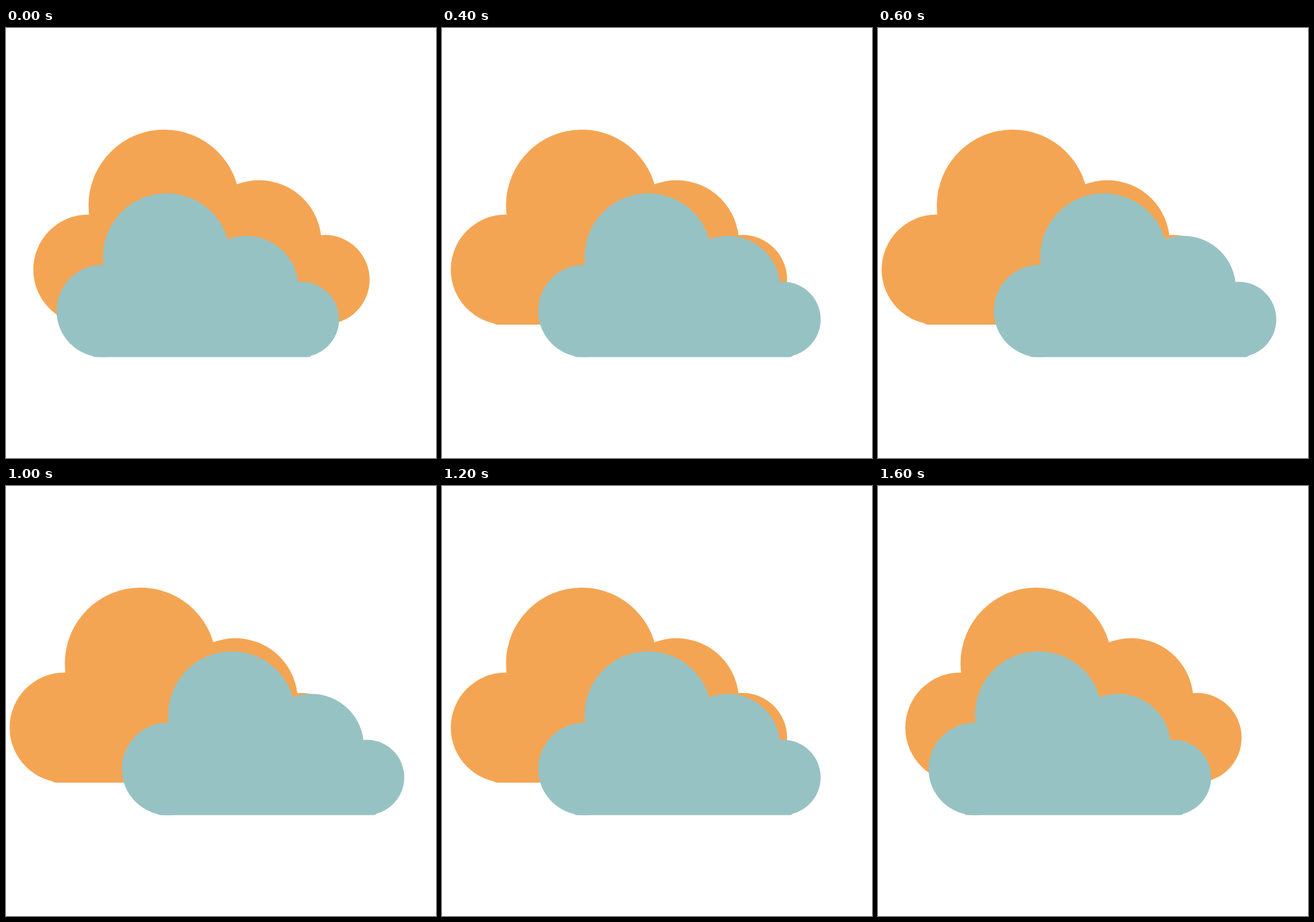
Write an HTML page that moves like this. It is 748 by 748 pixels and loops after 1.8 s.

```html
<!DOCTYPE html>
<html>
<head>
<meta charset="utf-8">
<title>Drifting clouds</title>
<style>
  html, body { margin: 0; width: 100%; height: 100%; overflow: hidden; background: #fff; }
  svg { display: block; width: 100%; height: 100%; }
</style>
</head>
<body>
<svg viewBox="0 0 748 748">
  <defs>
    <g id="cloud">
      <circle cx="143.3" cy="420.3" r="95.8"/>
      <circle cx="275.3" cy="308.6" r="131.8"/>
      <circle cx="440.2" cy="373.3" r="108.5"/>
      <circle cx="554.8" cy="437.8" r="77.7"/>
      <path d="M143 420L275 308L440 373L555 438L575 512.9Q572 516 568.5 516H127.5Q124.5 516 121.5 513.6Z"/>
    </g>
  </defs>
  <use id="back" href="#cloud" fill="#f4a553"/>
  <g id="front"><use href="#cloud" fill="#97c2c3" transform="translate(48.1 139.1) scale(.84)"/></g>
</svg>
<script>
  const STEP = 200, LAST = 8;
  const backX = [0, -16.4, -32.2, -41.2, -42];
  const frontX = [0, 41.2, 79.3, 113.4, 159.3];
  const back = document.getElementById('back');
  const front = document.getElementById('front');

  const moveTo = (el, x) => el.setAttribute('transform', `translate(${x} 0)`);

  // The clouds part in held steps, then retrace them.
  function draw() {
    const step = Math.floor(performance.now() / STEP) % (LAST + 1);
    const pose = Math.min(step, LAST - step);
    moveTo(back, backX[pose]);
    moveTo(front, frontX[pose]);
    requestAnimationFrame(draw);
  }
  draw();
</script>
</body>
</html>
```
